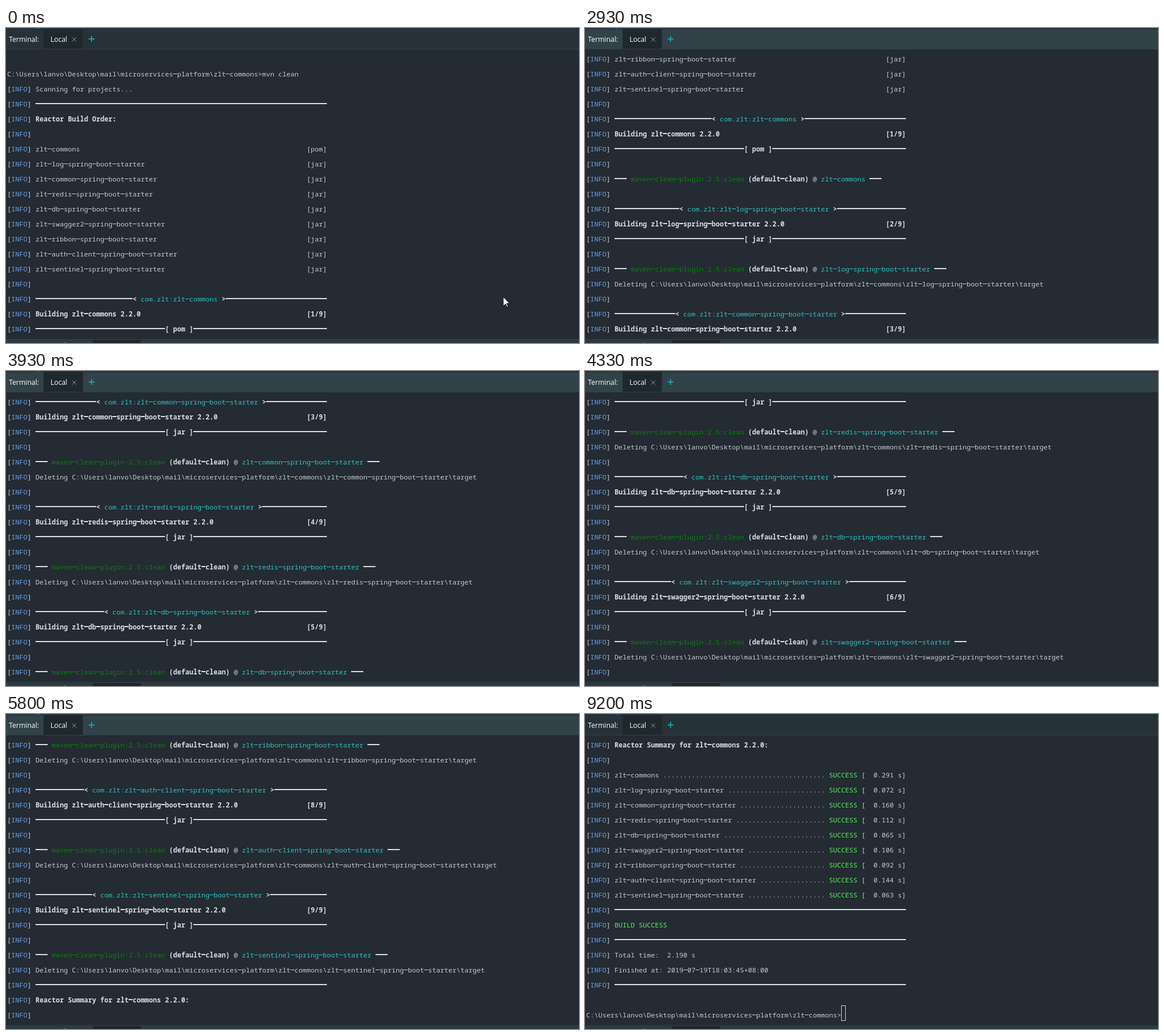
Write an HTML page with a canvas that moves like this. It is 991 px wide and 546 px high and loops after 9.27 s.

```html
<!DOCTYPE html>
<html lang="en">
<head>
<meta charset="utf-8">
<title>Terminal</title>
<style>
  html, body { margin: 0; width: 100%; height: 100%; overflow: hidden; background: #242b33; }
  canvas { display: block; }
</style>
</head>
<body>
<canvas id="stage" width="991" height="546"></canvas>
<script>
const ctx = document.getElementById('stage').getContext('2d');
const LOOP = 9270, CELL = 7, ROW = 26, ROWS = 19, WIDTH = 72;
const COLORS = {
  text: '#c6cbd0', bold: '#d9dee3', info: '#6c9fe0',
  cyan: '#2fc4c1', green: '#0a820a', ok: '#5cf05c'
};
const MONO = '"Noto Sans Mono", "DejaVu Sans Mono", "Liberation Mono", monospace';
const SANS = '"Open Sans", "Noto Sans", sans-serif';

// Size the font so that one character fills one terminal cell.
ctx.font = `100px ${MONO}`;
const fontSize = CELL * 100 / ctx.measureText('M').width;

const VERSION = '2.2.0';
const HOME = 'C:\\Users\\lanvo\\Desktop\\mail\\microservices-platform\\zlt-commons';
const modules = ['zlt-commons', ...['log', 'common', 'redis', 'db', 'swagger2', 'ribbon',
  'auth-client', 'sentinel'].map(name => `zlt-${name}-spring-boot-starter`)];
const durations = ['0.291', '0.072', '0.160', '0.112', '0.065', '0.106', '0.092', '0.144', '0.063'];

const dashes = n => '-'.repeat(n);
const justify = (left, right) => left.padEnd(WIDTH - right.length) + right;
const info = (...runs) => [['text', '['], ['info', 'INFO'], ['text', '] '], ...runs];
const rule = () => info(['bold', dashes(WIDTH)]);
const kind = i => i ? 'jar' : 'pom';

function buildModule(name, i) {
  const id = 'com.zlt:' + name;
  const free = WIDTH - 4 - id.length;
  const left = Math.floor(free / 2);
  const lines = [
    info(['bold', dashes(left) + '< '], ['cyan', id], ['bold', ' >' + dashes(free - left)]),
    info(['bold', justify(`Building ${name} ${VERSION}`, `[${i + 1}/9]`)]),
    info(['bold', `${dashes(32)}[ ${kind(i)} ]${dashes(33)}`]),
    info(),
    info(['bold', '--- '], ['green', 'maven-clean-plugin:2.5:clean'], ['bold', ' (default-clean)'],
      ['text', ' @ '], ['cyan', name], ['bold', ' ---'])
  ];
  if (i) lines.push(info(['text', `Deleting ${HOME}\\${name}\\target`]));
  if (i < modules.length - 1) lines.push(info());
  return lines;
}

const log = [
  [],
  [['text', HOME + '>mvn clean']],
  info(['text', 'Scanning for projects...']),
  rule(),
  info(['bold', 'Reactor Build Order:']),
  info(),
  ...modules.map((name, i) => info(['text', justify(name, `[${kind(i)}]`)])),
  info(),
  ...modules.flatMap(buildModule),
  rule(),
  info(['bold', `Reactor Summary for zlt-commons ${VERSION}:`]),
  info(),
  ...modules.map((name, i) => info(['text', (name + ' ').padEnd(52, '.') + ' '],
    ['ok', 'SUCCESS'], ['text', ` [  ${durations[i]} s]`])),
  rule(),
  info(['ok', 'BUILD SUCCESS']),
  rule(),
  info(['text', 'Total time:  2.190 s']),
  info(['text', 'Finished at: 2019-07-19T18:03:45+08:00']),
  rule(),
  [],
  [['text', HOME + '>']]
];

// [time, first visible line]
const scroll = [
  [0, 0], [1470, 1], [1530, 3], [1930, 7], [2600, 8], [2670, 10], [2930, 12], [3000, 14], [3200, 16],
  [3400, 18], [3470, 20], [3530, 22], [3600, 23], [3670, 25], [3730, 27],
  [3930, 29], [4000, 30], [4070, 32], [4130, 33], [4200, 35], [4270, 36], [4330, 38], [4400, 40],
  [4670, 43], [4730, 45], [5000, 47], [5070, 51], [5330, 53], [5400, 55], [5470, 57], [5530, 59],
  [5800, 61], [5870, 63], [6070, 66], [6130, 68], [6270, 70], [6330, 71], [6530, 73], [6800, 76], [6870, 78]
];
// [time, x, y]; a missing position hides the pointer
const pointer = [
  [0, 860, 466], [70, 846, 460], [130, 815, 446], [200, 772, 428], [270, 738, 418], [330, 728, 416],
  [400, 770, 418], [470, 835, 424], [530, 885, 432], [600, 909, 438], [2600],
  [8130, 876, 530], [8200, 881, 535], [8270, 883, 541], [8330]
];
const caret = [[0, ''], [7130, 'block'], [7670, ''], [8200, 'block'], [8670, ''], [9200, 'hollow']];
const focus = [[0, false], [2600, true], [9200, false]];

function at(track, t) {
  let current = track[0];
  for (const key of track) if (key[0] <= t) current = key;
  return current;
}

function rect(color, x, y, w, h) {
  ctx.fillStyle = color;
  ctx.fillRect(x, y, w, h);
}

function label(text, x, y, color, size = 12) {
  ctx.font = `${size}px ${SANS}`;
  ctx.fillStyle = color;
  ctx.fillText(text, x, y);
}

function drawLine(runs, baseline) {
  let x = 2;
  for (const [style, text] of runs) {
    const bold = style === 'bold';
    ctx.font = `${bold ? 'bold ' : ''}${fontSize}px ${MONO}`;
    ctx.fillStyle = COLORS[style];
    for (const char of text) {
      if (char === '-') ctx.fillRect(x, baseline - (bold ? 6 : 5), CELL, bold ? 2 : 1);
      else if (char !== ' ') ctx.fillText(char, x, baseline);
      x += CELL;
    }
  }
}

function drawChrome(active) {
  rect(active ? '#314249' : '#263238', 0, 2, 991, 35);
  rect('#2f4148', 0, 0, 991, 1);
  rect('#20292f', 0, 1, 991, 1);
  rect('#3568b0', 52, 0, 7, 1);
  rect('#2f4148', 0, 36, 991, 1);
  rect('#1f282d', 65, 2, 68, 34);
  label('Terminal:', 5, 24, '#ffffff');
  label('Local', 77, 24, '#ffffff');
  ctx.strokeStyle = '#8b979d';
  ctx.lineWidth = 1;
  ctx.beginPath();
  ctx.moveTo(114.5, 16.5); ctx.lineTo(121.5, 23.5);
  ctx.moveTo(121.5, 16.5); ctx.lineTo(114.5, 23.5);
  ctx.stroke();
  rect('#12a5a8', 143, 18, 10, 2);
  rect('#12a5a8', 147, 14, 2, 10);

  rect('#2b3940', 0, 539, 991, 7);
  rect('#1d262b', 150, 541, 83, 5);
  rect('#78858b', 100, 545, 3, 1);
}

function drawCaret(shape) {
  if (shape === 'block') rect('#c6cfd6', 443, 505, CELL, ROW);
  if (shape === 'hollow') {
    ctx.strokeStyle = '#c6cfd6';
    ctx.lineWidth = 1;
    ctx.strokeRect(443.5, 505.5, CELL, ROW);
  }
}

function drawPointer(x, y) {
  if (x === undefined) return;
  ctx.save();
  ctx.translate(x, y);
  ctx.beginPath();
  [[0, 0], [0, 16], [4, 12.5], [6.5, 18], [8.5, 17], [6, 11.5], [11, 11.5]]
    .forEach(([px, py]) => ctx.lineTo(px, py));
  ctx.closePath();
  ctx.fillStyle = '#ffffff';
  ctx.strokeStyle = '#10161a';
  ctx.lineWidth = 1;
  ctx.fill();
  ctx.stroke();
  ctx.restore();
}

function draw(t) {
  const top = at(scroll, t)[1];
  const [, x, y] = at(pointer, t);
  rect('#242b33', 0, 0, 991, 546);
  for (let row = 0; row < ROWS; row++) drawLine(log[top + row], 58 + row * ROW);
  drawCaret(at(caret, t)[1]);
  drawChrome(at(focus, t)[1]);
  drawPointer(x, y);
}

const start = performance.now();
function tick() {
  draw((performance.now() - start) % LOOP);
  requestAnimationFrame(tick);
}
tick();
</script>
</body>
</html>
```
